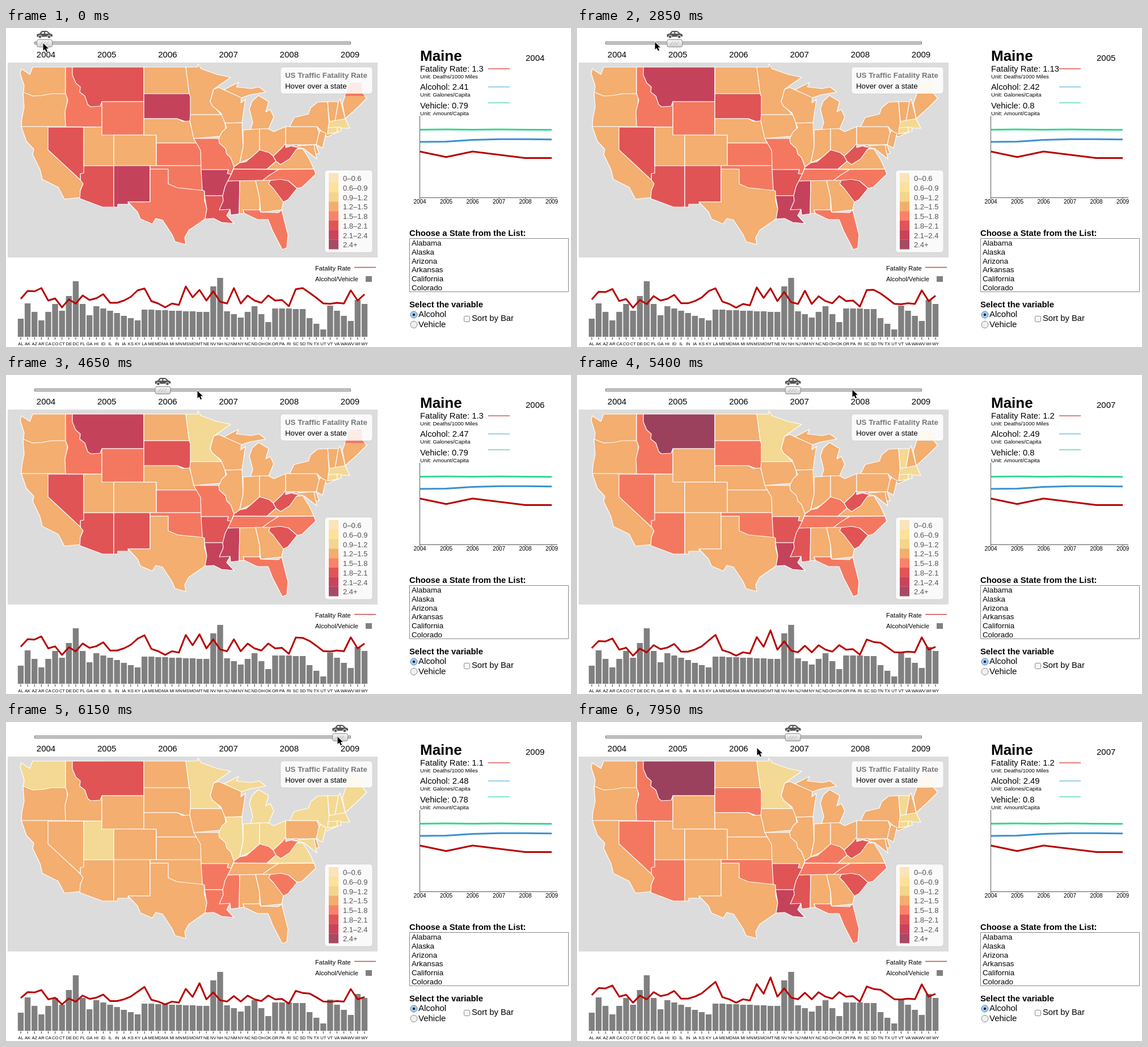
Recreate the animation shown at these times as an HTML page with a canvas. Size 996 by 563 pixels, loop 8 s.

```html
<!DOCTYPE html>
<html lang="en">
<head>
<meta charset="utf-8">
<title>US Traffic Fatality Rate</title>
<style>
html, body { margin: 0; width: 100%; height: 100%; overflow: hidden; background: #fff; }
canvas { display: block; }
</style>
</head>
<body>
<canvas id="stage" width="996" height="563"></canvas>
<script>
const ctx = document.getElementById('stage').getContext('2d');
const LOOP = 8000, STEP = 150;
const lerp = (a, b, k) => a + (b - a) * k;

const names = ('AL AK AZ AR CA CO CT DE DC FL GA HI ID IL IN IA KS KY LA ME MD MA MI MN MS MO MT ' +
  'NE NV NH NJ NM NY NC ND OH OK OR PA RI SC SD TN TX UT VT VA WA WV WI WY').split(' ');

// Painted in this order: a later state covers the loose edge of its neighbour
const outlines = {
  WA: '47,69 105,69 105,120 30,120 32,102 25,80 27,72 42,82',
  OR: '30,113 47,120 64,119 80,116 108,116 108,174 27,174 28,160 32,140',
  ID: '105,69 169,69 169,175 105,174 104,147 109,127 105,116',
  MT: '117,69 243,69 243,130 169,130 166,138 149,139 144,135 139,120 130,113 131,104 123,97 117,83',
  CA: '27,174 80,174 131,262 136,275 131,287 132,299 103,302 92,281 64,267 60,250 47,223 49,214 36,200',
  AZ: '131,243 190,243 190,316 170,316 130,301 131,287 136,275 131,268',
  NV: '74,175 137,175 137,256 131,257 131,268 74,215',
  UT: '137,175 190,175 190,243 137,243',
  WY: '169,130 243,130 243,189 169,189',
  CO: '190,189 265,189 265,243 190,243',
  NM: '190,243 254,243 254,307 215,307 216,311 197,311 197,316 190,316',
  ND: '243,69 317,69 323,116 243,116',
  SD: '243,116 328,116 325,168 302,160 243,160',
  NE: '243,160 302,160 311,165 324,164 335,203 265,203 265,189 243,189',
  KS: '265,203 345,203 345,243 265,243',
  TX: '254,249 300,249 350,287 350,305 354,319 351,337 322,357 315,370 317,382 298,377 293,365 276,339 264,336 258,346 237,337 232,325 215,307 254,307',
  OK: '254,243 350,243 350,287 322,284 302,282 286,275 286,249 254,249',
  MN: '317,69 338,69 338,63 344,72 372,82 396,87 366,108 360,130 379,153 325,153 325,121 323,116',
  IA: '325,153 384,153 389,190 331,195 324,164',
  MO: '331,195 385,195 402,245 397,258 390,257 392,250 344,250 343,216',
  AR: '344,250 392,250 390,257 397,258 386,296 350,296 350,288 346,286',
  LA: '350,296 386,296 395,320 389,331 402,345 380,343 366,336 351,337 354,319',
  MS: '391,270 412,269 411,328 396,330 395,320 376,321 383,305 382,296 386,280',
  AL: '412,269 440,269 447,300 447,321 418,321 420,327 411,328',
  WI: '366,108 375,105 384,109 415,122 414,132 422,126 416,167 386,168 379,150 364,138 360,130',
  MI: '384,109 410,96 406,104 432,107 446,104 458,113 430,118 415,123Z M445,119 463,130 458,148 466,144 472,157 463,178 431,179 435,167 429,143 434,129',
  IL: '386,168 416,167 418,210 412,238 402,245 396,229 389,222 387,213 376,203 375,195 381,183 389,176',
  IN: '418,180 447,178 447,222 412,238 418,210',
  OH: '447,178 463,178 472,183 493,174 493,206 471,228 447,222',
  VA: '460,249 476,235 512,214 523,213 535,232 543,249',
  KY: '402,245 412,238 423,236 436,225 447,215 464,220 471,226 476,235 460,249 401,249',
  WV: '471,226 488,210 493,203 493,211 512,206 520,209 512,214 500,231 484,241 476,235',
  NC: '466,250 543,249 546,258 522,281 513,283 498,270 445,269',
  TN: '401,249 480,250 464,260 452,269 391,270 397,258',
  GA: '440,269 470,269 489,307 486,321 449,325 447,300',
  SC: '466,269 484,267 498,270 513,283 497,303 489,307 471,283 463,275',
  FL: '418,321 447,321 449,325 480,326 486,321 497,365 495,388 487,391 470,358 462,338 443,338 420,327',
  PA: '493,174 548,174 556,195 546,206 493,206',
  NY: '500,174 508,158 533,152 537,141 549,131 567,130 570,176 567,187 584,184 566,192 548,174',
  NJ: '554,181 564,186 558,212 547,206 551,188',
  MD: '505,209 543,206 546,222 548,231 525,213',
  DE: '543,206 547,207 552,222 546,222',
  VT: '567,130 586,130 580,164 570,165',
  NH: '586,130 589,125 598,160 580,164',
  ME: '593,133 602,108 606,97 627,96 628,115 636,124 620,140 598,160',
  MA: '570,165 598,160 606,177 568,176',
  CT: '568,176 584,175 584,184 567,187',
  RI: '584,175 590,175 591,182 584,184'
};
const shapes = Object.entries(outlines).map(([name, pts]) => ({ name, path: new Path2D(`M${pts}Z`) }));

// Fatality rate of the first year in hundredths, in the order of names
const firstRates = [146,202,199,222,134,149,86,142,112,170,138,150,179,118,118,134,160,206,219,130,113,86,113,103,
  233,157,209,134,200,126,113,222,113,169,134,118,170,134,138,94,214,222,189,153,114,111,118,113,206,134,178];
// Share of the first rate left in 2007: most fall alike, a few stand out
const usualTrend = 0.89;
const trends = { MT: 1.22, LA: 1.02, WV: 1, SD: 0.78, WY: 0.78, NM: 0.66 };
const progress = [0, 0.25, 0.4, 1, 1, 1];
const lateFall = [1, 1, 1, 1, 0.92, 0.84];

function rateOf(name, year) {
  const n = year - 2004, trend = trends[name] ?? usualTrend;
  return firstRates[names.indexOf(name)] * lerp(1, trend, progress[n]) * lateFall[n];
}

// Bar heights run straight between these states
const barKeys = Object.entries({
  AL: 32, AK: 59, AR: 29, CO: 58, CT: 46, DC: 98, FL: 58, GA: 38, HI: 54, KY: 29, LA: 48, NE: 44, NV: 89,
  NH: 104, NJ: 45, NY: 34, ND: 54, OK: 26, OR: 50, SD: 49, TN: 33, UT: 13, VT: 55, WV: 28, WI: 65, WY: 58
}).map(([name, h]) => [names.indexOf(name), h]);

function barHeight(i) {
  const k = Math.max(1, barKeys.findIndex(key => key[0] >= i));
  const [[i0, h0], [i1, h1]] = [barKeys[k - 1], barKeys[k]];
  return lerp(h0, h1, (i - i0) / (i1 - i0));
}

const maineByYear = {
  rate: [1.3, 1.13, 1.3, 1.2, 1.1, 1.1],
  alcohol: [2.41, 2.42, 2.47, 2.49, 2.49, 2.48],
  vehicle: [0.79, 0.8, 0.79, 0.8, 0.79, 0.78]
};

const palette = ['#fbe4b9', '#fde19a', '#f3d58c', '#f3ae6d', '#f9826a', '#e15557', '#c9435b', '#a74a63'];
const fills = ['#f3d993', '#f3ae70', '#f47860', '#e05456', '#c5425b', '#9b415d'];
const limits = [100, 150, 188, 220, 250];
const rateFill = r => fills[limits.filter(l => r >= l).length];

// Pointer drags: start, steps, from x, y, to x, y
const drags = [
  [0, 1, 65, 27, 65, 27], [750, 2, 90, 27, 102, 27], [1800, 4, 102, 27, 72, 27],
  [2700, 5, 122, 25, 182, 25], [3600, 5, 200, 26, 284, 28], [4650, 3, 337, 28, 385, 27],
  [5400, 2, 485, 26, 490, 26], [5850, 3, 505, 26, 584, 26], [6300, 4, 570, 26, 492, 27],
  [7200, 4, 470, 28, 386, 37], [7950, 1, 317, 46, 317, 46]
];
const yearChanges = [[0, 2004], [2850, 2005], [3900, 2006], [4800, 2007], [5550, 2008], [6000, 2009], [6600, 2008], [7350, 2007]];
const latest = (list, t) => list.filter(e => e[0] <= t).pop();

function pointerAt(t) {
  const [start, n, x0, y0, x1, y1] = latest(drags, t);
  const k = n > 1 ? Math.min(Math.floor((t - start) / STEP), n - 1) / (n - 1) : 0;
  return [lerp(x0, x1, k), lerp(y0, y1, k)];
}

function text(str, x, y, size, { bold = false, color = '#000', align = 'left' } = {}) {
  ctx.font = `${bold ? 'bold ' : ''}${size}px "Liberation Sans", Arial, sans-serif`;
  ctx.fillStyle = color;
  ctx.textAlign = align;
  ctx.fillText(str, x, y);
}

function line(points, color, width) {
  ctx.beginPath();
  points.forEach(([x, y]) => ctx.lineTo(x, y));
  ctx.strokeStyle = color;
  ctx.lineWidth = width;
  ctx.stroke();
}

function box(x, y, w, h, r, fill, stroke) {
  ctx.beginPath();
  ctx.roundRect(x, y, w, h, r);
  ctx.fillStyle = fill;
  ctx.fill();
  if (!stroke) return;
  ctx.strokeStyle = stroke;
  ctx.lineWidth = 1;
  ctx.stroke();
}

function disc(x, y, r, fill, stroke) {
  box(x - r, y - r, 2 * r, 2 * r, r, fill, stroke);
}

function info(x, y, w, h) {
  box(x, y, w, h, 5, 'rgba(255,255,255,.85)', 'rgba(0,0,0,.08)');
}

function drawSlider(year) {
  box(50.5, 24.5, 557, 4, 0, '#d0d0d0', '#777');
  for (let i = 0; i < 6; i++) text(2004 + i, 70.5 + i * 107.2, 52, 15, { align: 'center' });
  const x = 68 + (year - 2004) * 104.2;
  const shade = ctx.createLinearGradient(0, 20, 0, 33);
  shade.addColorStop(0, '#fafafa');
  shade.addColorStop(1, '#d2d2d2');
  box(x - 13.5, 20.5, 27, 13, 3, shade, '#888');
  for (let i = -1; i < 2; i++) line([[x - 3 + i * 5, 30], [x + 2 + i * 5, 24]], '#aaa', 1);
  ctx.save();
  ctx.translate(x, 5);
  ctx.fillStyle = '#555';
  ctx.fill(new Path2D('M-14,7 Q-13,5 -9,5 L-6,1 Q-5,0 -3,0 L3,0 Q5,0 7,2 L10,5 Q14,5 14,8 L14,10 -13,11Z'));
  ctx.fillStyle = '#eee';
  ctx.fill(new Path2D('M-6,5 L-4,2 -1,2 -1,5Z M1,5 L1,2 4,2 7,5Z'));
  disc(-8, 10.5, 2.8, '#555', '#fff');
  disc(8, 10.5, 2.8, '#555', '#fff');
  ctx.restore();
}

function drawMap(year) {
  ctx.fillStyle = '#dcdcdc';
  ctx.fillRect(3, 61, 652, 344);
  ctx.strokeStyle = '#fff';
  ctx.lineWidth = 1.2;
  ctx.lineJoin = 'round';
  for (const { name, path } of shapes) {
    ctx.fillStyle = rateFill(rateOf(name, year));
    ctx.fill(path);
    ctx.stroke(path);
  }
  // Northern tip of Maine is shaded on its own
  const high = maineByYear.rate[year - 2004] >= 1.3;
  ctx.save();
  ctx.beginPath();
  ctx.rect(595, 90, 45, high ? 30 : 26);
  ctx.clip();
  ctx.fillStyle = fills[high ? 2 : 0];
  ctx.fill(shapes.find(s => s.name === 'ME').path);
  ctx.restore();

  info(484, 69, 162, 47);
  text('US Traffic Fatality Rate', 492, 88, 13.3, { bold: true, color: '#777' });
  text('Hover over a state', 492, 107, 13.3);

  info(562, 251, 84, 145);
  ['0–0.6', '0.6–0.9', '0.9–1.2', '1.2–1.5', '1.5–1.8', '1.8–2.1', '2.1–2.4', '2.4+'].forEach((label, i) => {
    ctx.fillStyle = palette[i];
    ctx.fillRect(569, 256 + i * 16.8, 17, 16.9);
    text(label, 594, 270 + i * 16.75, 13, { color: '#555' });
  });
}

function drawBars(year) {
  const at = i => 26 + i * 12.12;
  names.forEach((name, i) => {
    const h = Math.round(barHeight(i));
    ctx.fillStyle = '#808080';
    ctx.fillRect(at(i) - 5.2, 545 - h, 10.4, h);
    line([[at(i), 546], [at(i), 550]], '#333', 1);
    text(name, at(i), 559.5, 7.6, { align: 'center' });
  });
  line(names.map((name, i) => [at(i), 482 + (130 - rateOf(name, year)) / 4]), '#b80000', 3);
  text('Fatality Rate', 545, 428, 11.2);
  text('Alcohol/Vehicle', 545, 447, 11.2);
  line([[614, 422.5], [652, 422.5]], '#cc4444', 1.6);
  ctx.fillStyle = '#808080';
  ctx.fillRect(634, 438, 11, 10);
}

function drawPanel(year) {
  const { rate, alcohol, vehicle } = maineByYear, n = year - 2004;
  text('Maine', 730, 58, 26, { bold: true });
  text(year, 916, 58, 15);
  [
    [`Fatality Rate: ${rate[n]}`, 'Unit: Deaths/1000 Miles', 77, '#dd5555', 72],
    [`Alcohol: ${alcohol[n]}`, 'Unit: Galones/Capita', 109, '#79bfec', 104],
    [`Vehicle: ${vehicle[n]}`, 'Unit: Amount/Capita', 142, '#5fdcae', 132]
  ].forEach(([label, unit, y, color, mark]) => {
    text(label, 730, y, 14.8);
    text(unit, 730, y + 11.7, 9.6);
    line([[850, mark], [888, mark]], color, 1.6);
  });

  const at = i => 729.5 + i * 46.5;
  const plot = (values, toY, color) => line(values.map((v, i) => [at(i), toY(v)]), color, 3);
  line([[729.5, 155], [729.5, 299.5], [972, 299.5]], '#555', 1);
  plot(vehicle, v => 179 + (0.8 - v) * 40, '#33d690');
  plot(alcohol, v => 201 - (v - 2.41) * 60, '#3a90d2');
  plot(rate, v => 218 + (1.3 - v) * 57, '#b80000');
  for (let i = 0; i < 6; i++) {
    line([[at(i), 299], [at(i), 302]], '#555', 1);
    text(2004 + i, at(i), 310, 10, { align: 'center' });
  }
}

function drawControls() {
  text('Choose a State from the List:', 711, 367, 14.8, { bold: true });
  box(711.5, 371.5, 280, 94, 0, '#fff', '#888');
  ['Alabama', 'Alaska', 'Arizona', 'Arkansas', 'California', 'Colorado'].forEach((s, i) =>
    text(s, 715, 384 + i * 15.8, 13.3));
  text('Select the variable', 711, 493, 14.8, { bold: true });
  disc(719, 506, 6, '#a5d0f2', '#5580a8');
  disc(719, 506, 2.2, '#102040');
  disc(719, 523.5, 6, '#f0f0f0', '#888');
  text('Alcohol', 727, 510, 15);
  text('Vehicle', 727, 528, 15);
  box(807.5, 508.5, 10, 10, 2, '#f6f6f6', '#888');
  text('Sort by Bar', 821, 517, 14.8);
}

const arrow = new Path2D('M0,0 L0,13 3,10.2 5.4,15.2 7.6,14.2 5.3,9.3 9.4,9.3Z');
function drawPointer([x, y]) {
  ctx.save();
  ctx.translate(x + 0.5, y);
  ctx.fillStyle = '#000';
  ctx.strokeStyle = '#fff';
  ctx.lineWidth = 1.6;
  ctx.stroke(arrow);
  ctx.fill(arrow);
  ctx.restore();
}

function draw(t) {
  const year = latest(yearChanges, t)[1];
  ctx.fillStyle = '#fff';
  ctx.fillRect(0, 0, 996, 563);
  drawSlider(year);
  drawMap(year);
  drawBars(year);
  drawPanel(year);
  drawControls();
  drawPointer(pointerAt(t));
}

const began = performance.now();
function tick() {
  draw((performance.now() - began) % LOOP);
  requestAnimationFrame(tick);
}
tick();
</script>
</body>
</html>
```
